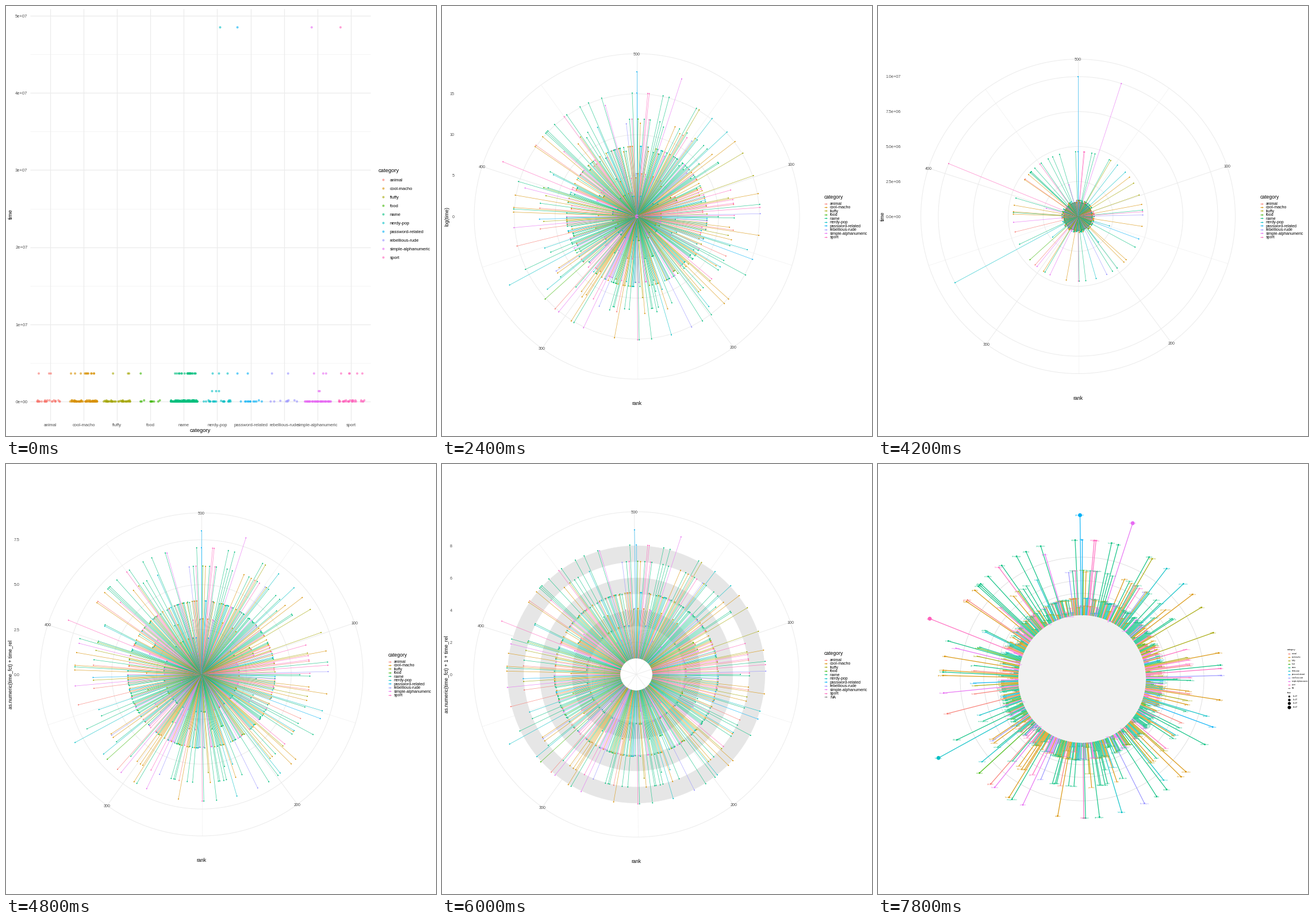
A matplotlib script that plays this animation: 748 by 748 pixels, repeating every 8 s.

```python
import random
from itertools import zip_longest

import numpy as np
import matplotlib.pyplot as plt
from matplotlib.animation import FuncAnimation
from matplotlib.collections import LineCollection
from matplotlib.patches import Circle, Wedge

SIZE, DPI = 748, 100
PT = 72 / DPI
STEP, HOLD, LOOP = 200, 600, 8000

plt.rcParams["font.family"] = "Liberation Sans"
CATS = ["animal", "cool-macho", "fluffy", "food", "name", "nerdy-pop",
        "password-related", "rebellious-rude", "simple-alphanumeric", "sport"]
HUES = ["#F8766D", "#D89000", "#A3A500", "#39B600", "#00BF7D",
        "#00BFC4", "#00B0F6", "#9590FF", "#E76BF3", "#FF62BC"]
GREY = "#7F7F7F"
MAJOR, MINOR, TICK = "#EBEBEB", "#F1F1F1", "#4D4D4D"

rng = random.Random(11)

# (rank, horizontal jitter) of the passwords that last for years
YEARS = {
    0: [(308, -20), (356, -2), (424, 1)],
    1: [(74, -22), (111, -15), (138, -5), (184, 2), (188, 4), (265, 5),
        (295, 7), (378, 8), (381, 13), (389, 14), (423, 18), (431, 18)],
    2: [(43, -7), (83, 19), (99, 21)],
    3: [(317, -17)],
    5: [(53, -8), (66, 3), (228, 18)],
    6: [(1, -23), (154, -5)],
    7: [(124, -21), (214, 7)],
    8: [(286, -6), (305, 10), (368, 15)],
    9: [(8, -17), (9, -3), (120, -2), (250, 11), (450, 20)],
}
NAME_RANKS = [18, 22, 41, 118, 165, 199, 206, 241, 249, 293, 340, 380, 398,
              434, 435, 436, 442, 452, 462, 468, 477, 497]
YEARS[4] = [(r, rng.triangular(-20, 23, 15)) for r in NAME_RANKS]
SHORT_YEARS = {5: [(149, -9), (197, -2), (321, 3)], 8: [(395, 2), (478, 4)]}
AGES = {5: [(336, 5)], 6: [(500, -23)], 8: [(26, -10)], 9: [(406, -18)]}

# minutes to crack, count, position inside the unit, radius in the ring chart
UNITS = [(0.19, 11, 0.3, 112.5), (18.5, 51, 0.1, 119), (186, 43, 0.1, 127),
         (5357, 238, 0.1, 140.5), (21000, 5, 0.48, 165), (1.5e5, 87, 0.04, 189)]
REST = [26, 67, 41, 10, 161, 23, 12, 9, 55, 31]


def make_data():
    rows = []
    for group, time, rel, rad in ((YEARS, 3.632e6, 0.06, 242),
                                  (SHORT_YEARS, 1.345e6, 0.03, 226),
                                  (AGES, 4.85e7, 1.0, 285)):
        for cat, items in group.items():
            rows += [(r, cat, dx, time, 7, rel, rad) for r, dx in items]
    used = {row[0] for row in rows}
    ranks = [r for r in range(1, 501) if r not in used]
    rng.shuffle(ranks)
    cats = [c for c, n in enumerate(REST) for _ in range(n)]
    cats.sort(key=lambda c: rng.random() - 0.4 * (c == 8))
    units = [u for u, spec in enumerate(UNITS, 1) for _ in range(spec[1])]
    for r, cat, u in zip(ranks, cats, units):
        time, _, rel, rad = UNITS[u - 1]
        k = rng.choice([0.6, 1, 1])
        rows.append((r, cat, rng.uniform(-23.5, 23.5), time * k, u,
                     rel * k, rad - 2 * (k < 1)))
    return np.array(sorted(rows)).T


RANK, CAT, JIT, TIME, UNIT, REL, RING = make_data()
CAT = CAT.astype(int)
COLOR = np.array(HUES)[CAT]
BIG = TIME > 1e7


def word():
    return "".join(rng.choice("bdfgklmnprstv") + rng.choice("aeiou")
                   for _ in range(rng.choice([3, 3, 4])))


WORDS = [word() for _ in RANK]

fig = plt.figure(figsize=(SIZE / DPI, SIZE / DPI), dpi=DPI, facecolor="white")
ax = fig.add_axes([0, 0, 1, 1])


def text(x, y, s, px, color="black", ha="left", **kw):
    ax.text(x, y + 0.36 * px, s, fontsize=px * PT, color=color, ha=ha,
            va="baseline", **kw)


def side_title(s, y, px, x=8.5):
    ax.text(x, y, s, fontsize=px * PT, rotation=90, ha="center", va="center")


def line(x, y, color=MAJOR, lw=1.0):
    ax.plot(x, y, color=color, lw=lw * PT, zorder=0.5, solid_capstyle="butt")


def dots(x, y, r, color, alpha=1.0, z=4):
    ax.scatter(x, y, s=(2 * np.asarray(r) * PT) ** 2, c=color, alpha=alpha,
               linewidths=0, zorder=z)


def ring(cx, cy, r, color=MAJOR, lw=1.0):
    ax.add_patch(Circle((cx, cy), r, fill=False, ec=color, lw=lw * PT, zorder=0.5))


def spot(cx, cy, theta, r):
    return cx + r * np.sin(theta), cy - r * np.cos(theta)


def spokes(cx, cy, theta, r0, r1, lw, alpha):
    a = np.stack(spot(cx, cy, theta, r0), -1)
    b = np.stack(spot(cx, cy, theta, r1), -1)
    ax.add_collection(LineCollection(np.stack([a, b], 1), colors=COLOR,
                                     linewidths=lw * PT, alpha=alpha, zorder=3))


def jitter_plot(log=False):
    left, right, top, bottom = 42, 634, 4.5, 721
    if log:
        low, high = np.log10(TIME.min()), np.log10(TIME.max())

        def level(v):
            return 688 - (np.log10(v) - low) / (high - low) * 651
        ticks = [1e1, 1e3, 1e5, 1e7]
        minors = [1e0, 1e2, 1e4, 1e6]
    else:
        def level(v):
            return 688 - 134.2e-7 * v
        ticks = [k * 1e7 for k in range(6)]
        minors = [(k + 0.5) * 1e7 for k in range(5)]
    for v in minors:
        line([left, right], [level(v)] * 2, MINOR, 0.7)
    for v in ticks:
        line([left, right], [level(v)] * 2, lw=1.2)
        text(37.5, level(v), f"{v:.0e}", 7.6, TICK, "right")
    mid = 77 + 58.1 * np.arange(10)
    for x, name in zip(mid, CATS):
        line([x, x], [top, bottom], lw=1.2)
        text(x, 728, name, 7.6, TICK, "center")
    dots(mid[CAT] + JIT, level(TIME), 2, COLOR, 0.6)
    text(338, 738, "category", 9.5, ha="center")
    side_title("time", 362, 9.5)
    text(648, 286, "category", 9.5)
    for i, name in enumerate(CATS):
        dots(656, 302 + 15 * i, 2, HUES[i], 0.6)
        text(668, 302 + 15 * i, name, 7.7)


def key_list(y, names):
    text(665, y, "category", 8.7)
    for i, (name, hue) in enumerate(zip_longest(names, HUES, fillvalue=GREY)):
        ky = y + 11.5 + 6.45 * i
        line([665.5, 670.5], [ky, ky], hue, 0.9)
        dots(668, ky, 1, hue)
        text(675, ky, name, 7)


def polar_plot(values, ticks, fmt, cx=345, R=276, tick_x=34.5, title="time",
               period=499, names=CATS, bands=None, lw=0.75, dot=1.0, core=0):
    cy = 366
    unit = R * 8 / 9 / values.max()
    turn = 2 * np.pi / period
    for r in range(50, 501, 50):
        x, y = spot(cx, cy, (r - 1) * turn, R)
        line([cx, x], [cy, y], *((MINOR, 0.7) if r % 100 else (MAJOR, 1)))
        if r % 100 == 0:
            text(x, y, str(r), 7.1, TICK, "center")
    for v in ticks:
        ring(cx, cy, v * unit)
        text(tick_x, cy - v * unit, format(v, fmt), 7.1, TICK, "right")
    ring(cx, cy, R)
    if bands:
        for v in (3, 5, 7):
            ax.add_patch(Wedge((cx, cy), (v + 1) * unit, 0, 360, width=unit,
                               fc=bands, lw=0, zorder=1))
    theta = (RANK - 1) * turn
    spokes(cx, cy, theta, core * unit, values * unit, lw, 0.72)
    dots(*spot(cx, cy, theta, values * unit), dot, COLOR)
    text(cx, cy + R + 42, "rank", 8.7, ha="center")
    side_title(title, cy, 8.7)
    key_list(332 if len(names) == 10 else 329, names)


def capped(limit):
    return np.where(BIG, limit, TIME + 1e6)


def ring_keys(y, label_y, time_y, ys, radii, lw):
    text(712, y, "category", 3.9)
    for i, (name, hue) in enumerate(zip_longest(CATS + ["NA"], HUES, fillvalue=GREY)):
        ky = label_y + 6 * i
        line([713, 717], [ky, ky], hue, lw)
        dots(715, ky, 0.8, hue)
        text(720, ky, name, 3)
    text(712, time_y, "time", 3.9)
    for k, (ky, r) in enumerate(zip(ys, radii), 1):
        dots(717 if lw < 0.8 else 715.5, ky, r, "black")
        text(725 if lw < 0.8 else 721.5, ky, f"{k}e+07", 3)


def ring_plot(bold=False, labels=False):
    cx, cy, core = 355, 374, 111
    for r in (149, 171, 212) if bold else (149, 171, 212, 248, 319.5):
        ring(cx, cy, r, "#DADADA" if bold else "#9C9C9C", 0.8 if bold else 0.9)
    ax.add_patch(Circle((cx, cy), core, fc="#F1F1F1", lw=0, zorder=1))
    theta = (RANK - 1) * 2 * np.pi / 500
    x, y = spot(cx, cy, theta, RING)
    weight = np.sqrt(TIME / 4.85e7)
    if bold:
        spokes(cx, cy, theta, core, RING, 1.25, 0.9)
        dots(x, y, 0.6 + 2.8 * weight, COLOR)
        ring_keys(323, 330, 398, (404, 410, 416, 423), (1.7, 2.2, 2.6, 3), 1.1)
    else:
        spokes(cx, cy, theta, core, RING, 0.6, 0.42)
        dots(x, y, 0.65 + 4.1 * weight, COLOR)
        ring_keys(319, 326, 393, (400, 407, 415, 425), (2.3, 3, 3.7, 4.4), 0.5)
    if labels:
        for px, py, s, hue in zip(x, y, WORDS, COLOR):
            text(px, py, s, 4, hue, "center", alpha=0.75, zorder=5)


MILLIONS = [k * 2e6 for k in range(5)]
TENS = [k * 1e7 for k in range(6)]
QUARTERS = [0, 2.5, 5, 7.5]
STACK = UNIT + 1 + REL

SCENES = [
    lambda: jitter_plot(),
    lambda: jitter_plot(log=True),
    lambda: polar_plot(capped(8e6), MILLIONS, ".0e"),
    lambda: polar_plot(capped(8e6), MILLIONS, ".0e", lw=1.2, dot=1.3),
    lambda: polar_plot(np.log(TIME + 1), [0, 5, 10, 15], "d", 339, 283, 22,
                       "log(time)"),
    lambda: polar_plot(TIME + 5e6, TENS, ".0e"),
    lambda: polar_plot(capped(8e6), MILLIONS, ".0e"),
    lambda: polar_plot(capped(1e7), [k * 2.5e6 for k in range(5)], ".1e",
                       348, 273.5, 40),
    lambda: polar_plot(STACK - 1, QUARTERS, ".1f", 340, 281, 24,
                       "as.numeric(time_fct) + time_rel"),
    lambda: polar_plot(STACK, QUARTERS, ".1f", 340, 281, 24,
                       "as.numeric(time_fct) + 1 + time_rel", 500,
                       CATS + ["NA"], "black"),
    lambda: polar_plot(STACK, [0, 2, 4, 6, 8], "d", 338, 283, 18,
                       "as.numeric(time_fct) + 1 + time_rel", 500,
                       CATS + ["NA"], "#E6E6E6", core=1),
    lambda: ring_plot(),
    lambda: ring_plot(bold=True),
    lambda: ring_plot(bold=True, labels=True),
]


def draw(i):
    ax.clear()
    ax.set(xlim=(0, SIZE), ylim=(SIZE, 0))
    ax.axis("off")
    SCENES[i * STEP // HOLD]()
    return []


anim = FuncAnimation(fig, draw, frames=LOOP // STEP, interval=STEP,
                     init_func=lambda: [], repeat=True, repeat_delay=0)
plt.show()
```
